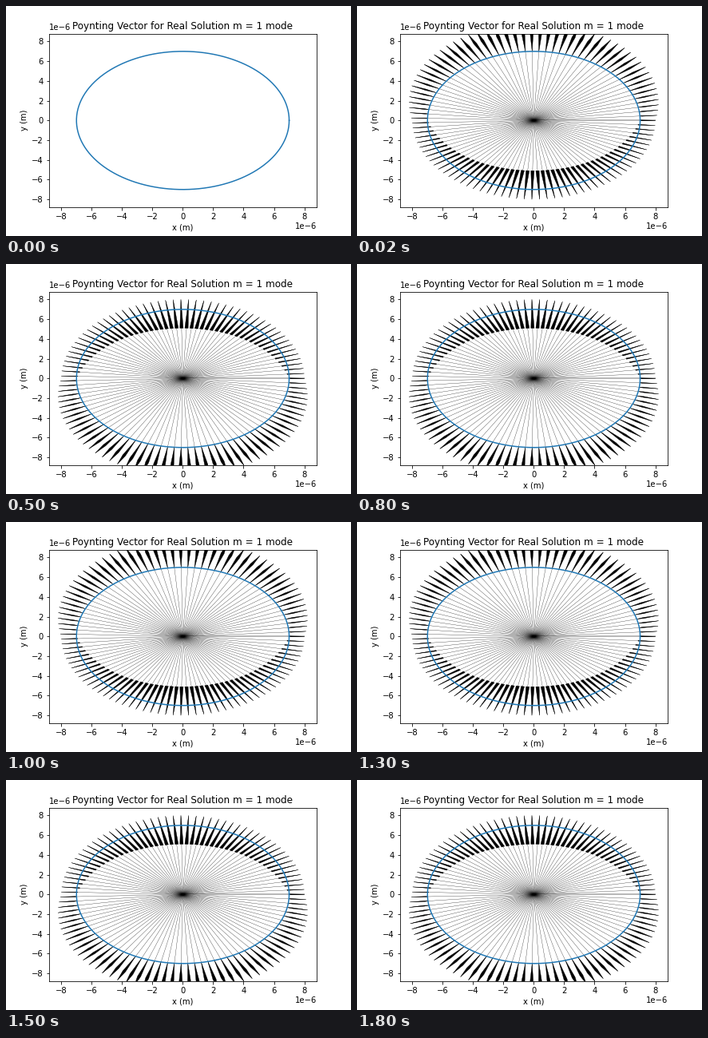
Write a matplotlib script that moves like this. It is 432 px wide and 288 px high and loops after 2 s.

```python
import numpy as np
import matplotlib.pyplot as plt
from matplotlib.animation import FuncAnimation
from matplotlib.collections import LineCollection, PolyCollection

RADIUS = 7.0      # micrometres
LIMIT = 8.8
SWING = 1.9
HEAD_LEN = 1.0
INTERVAL, FRAMES = 20, 100

plt.rcParams.update({"font.family": "DejaVu Sans", "font.size": 10})
fig, ax = plt.subplots(figsize=(6, 4), dpi=72)
fig.subplots_adjust(left=0.125, right=0.9, bottom=0.125, top=0.88)

theta = np.linspace(0, 2 * np.pi, 100)
round_angle = np.linspace(0, 2 * np.pi, 400)


def spike(angle, flow):
    """Slim head: widest where the flow ends, tapering to both sides."""
    along = np.array([np.cos(angle), np.sin(angle)])
    across = np.array([-along[1], along[0]])
    wing = RADIUS + SWING * flow
    half = 0.03 + 0.08 * abs(flow)
    inner = min(RADIUS, wing)
    outer = max(RADIUS, wing) + HEAD_LEN
    return [along * inner, along * wing + across * half,
            along * outer, along * wing - across * half]


def arrows(sign):
    """Radial arrows whose flow swings with sin(theta)."""
    spikes = [spike(a, sign * np.sin(a)) for a in theta]
    shafts = [[(0, 0), points[2]] for points in spikes]
    parts = (LineCollection(shafts, colors="black", linewidths=0.3),
             PolyCollection(spikes, facecolors="black", edgecolors="black",
                            linewidths=0.4))
    for part in parts:
        part.set_zorder(1)
        ax.add_collection(part, autolim=False)
    return parts


up, down = arrows(1), arrows(-1)
ax.plot(RADIUS * np.cos(round_angle), RADIUS * np.sin(round_angle),
        color="#1f77b4", lw=1.5)

ax.set(xlim=(-LIMIT, LIMIT), ylim=(-LIMIT, LIMIT),
       xticks=range(-8, 9, 2), yticks=range(-8, 9, 2),
       xlabel="x (m)", ylabel="y (m)")
ax.set_title("Poynting Vector for Real Solution m = 1 mode", fontsize=12)
for corner, shift, ha, va in (((0, 1), (0, 3), "left", "bottom"),
                              ((1, 0), (0, -19), "right", "top")):
    ax.annotate("1e\u22126", corner, xycoords="axes fraction", xytext=shift,
                textcoords="offset points", ha=ha, va=va)


def update(i):
    phase = i * INTERVAL // 500 % 2
    for part in up:
        part.set_visible(i > 0 and phase == 0)
    for part in down:
        part.set_visible(phase == 1)
    return up + down


anim = FuncAnimation(fig, update, frames=FRAMES, interval=INTERVAL,
                     repeat=True, repeat_delay=0, blit=False)
plt.show()
```
